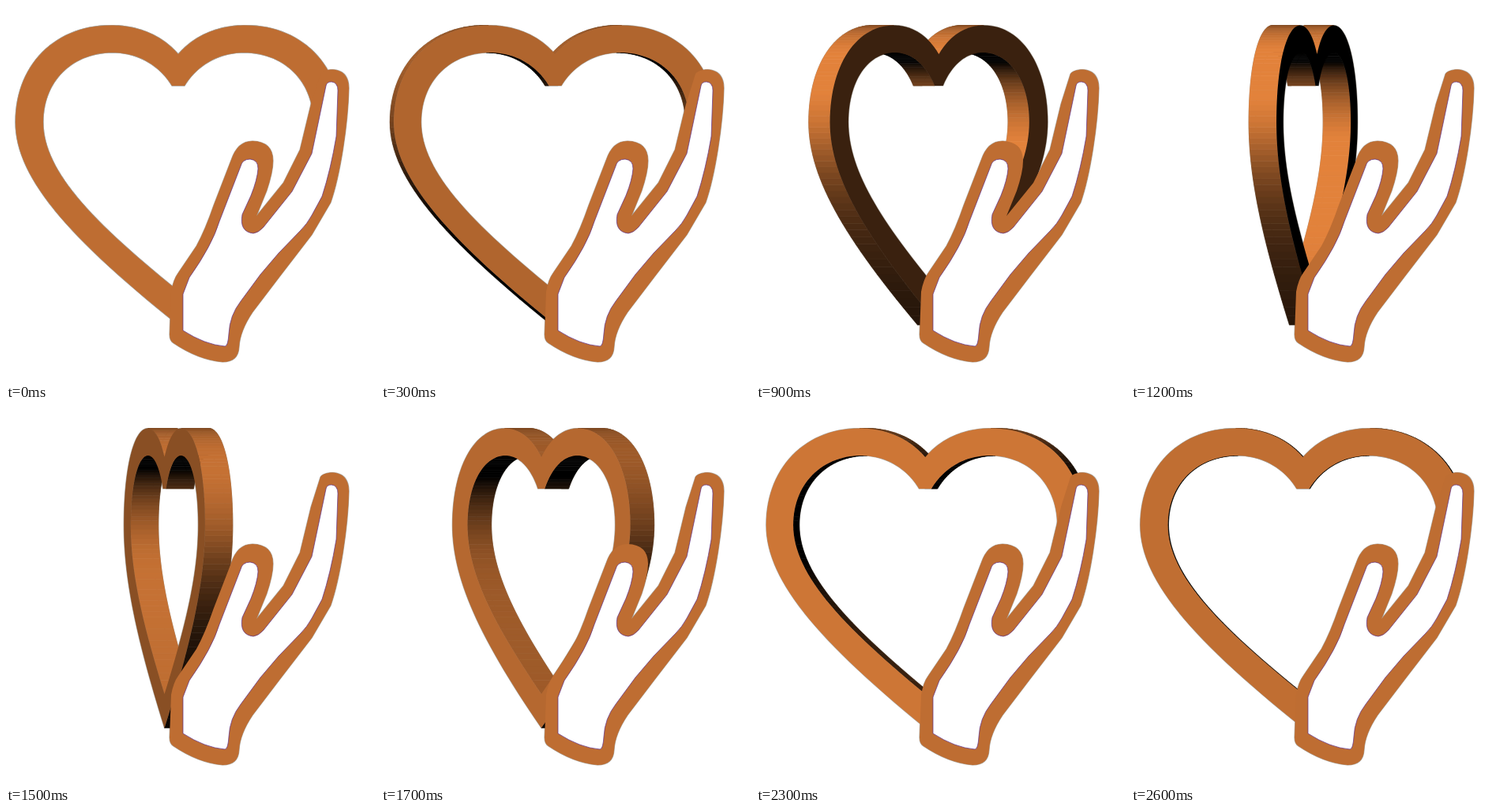
Write an HTML page with a canvas that moves like this. It is 467 by 475 pixels and loops after 2700 ms.

```html
<!DOCTYPE html>
<html lang="en">
<head>
<meta charset="utf-8">
<title>Turning heart in a hand</title>
<style>
html, body { margin: 0; width: 100%; height: 100%; overflow: hidden; background: #fff; }
canvas { display: block; }
</style>
</head>
<body>
<canvas id="stage" width="467" height="475"></canvas>
<script>
const ctx = document.getElementById('stage').getContext('2d');
const LOOP = 2700, STEP = 100, AXIS = 218, HALF_DEPTH = 18;
const LIGHT = { x: -92.5, up: 115, z: 189.6 };
const HALO = '#aaa69f';

// Left halves of the heart as joined cubic curves, from the notch to the tip
const OUTER = [[218, 61], [197, 37], [167, 24.5], [133, 24.5], [62, 24.5], [12, 75],
  [12, 147], [12, 215], [75, 290], [218, 404]];
const INNER = [[210, 101], [195, 76], [168, 59], [135, 59], [84, 59], [47, 95],
  [47, 147], [47, 207], [105, 270], [218, 361]];

const handEdge = new Path2D(`M398,86 C404,78 434,75 434,104 C433,150 423,215 411,249
  L387,290 L347,342 L312,388 Q296,412 295,432 Q294,451 274,451 Q243,448 212,427
  Q207,424 207,416 L209,362 Q212,346 218,338 L241,304 Q252,284 263,252 L285,195
  Q293,171 312,171 Q338,172 338,196 Q338,210 330,234 L317,266 L351,224 L372,182 L386,124 Z`);
const palm = new Path2D(`M405,101 Q406,96 412,96 Q420,97 420,107 L418,165 Q411,207 400,241
  L387,265 Q381,276 373,284 L345,313 L322,340 L297,374 Q283,392 282,415 Q281,431 277,431
  Q252,429 224,411 L224,365 L232,344 Q261,303 270,273 L297,203 Q299,194 309,194
  Q319,195 319,206 Q318,220 310,240 L299,264 Q295,286 313,288 Q320,287 326,280
  L362,235 L387,187 Z`);

function sampleCurves(points, parts = 30) {
  const out = [points[0]];
  for (let i = 0; i + 3 < points.length; i += 3) {
    const [a, b, c, d] = points.slice(i, i + 4);
    for (let k = 1; k <= parts; k++) {
      const u = k / parts, v = 1 - u;
      out.push([0, 1].map(j =>
        v * v * v * a[j] + 3 * v * v * u * b[j] + 3 * v * u * u * c[j] + u * u * u * d[j]));
    }
  }
  return out;
}

function wholeContour(half) {
  const left = sampleCurves(half).map(([x, y]) => [x - AXIS, y]);
  return [...left, ...left.map(([x, y]) => [-x, y]).reverse()];
}

const contours = [OUTER, INNER].map(wholeContour);

const walls = contours.flatMap((contour, inner) => contour.map((p, i) => {
  const q = contour[(i + 1) % contour.length];
  const dx = q[0] - p[0], dy = q[1] - p[1], len = Math.hypot(dx, dy);
  const sign = inner ? -1 : 1;
  return { p, q, len, nx: -sign * dy / len, ny: sign * dx / len, mid: (p[0] + q[0]) / 2 };
})).filter(wall => wall.len > 0);

function shade(light) {
  const v = Math.max(0, Math.min(226, light));
  return `rgb(${v}, ${v * 0.574}, ${v * 0.263})`;
}

function trace(path, points) {
  points.forEach(([x, y], i) => i ? path.lineTo(x, y) : path.moveTo(x, y));
  path.closePath();
  return path;
}

function outline(path, color, width) {
  ctx.strokeStyle = color;
  ctx.lineWidth = width;
  ctx.stroke(path);
}

// Half a turn, softly eased at both ends
function turnAt(time) {
  const u = time / LOOP;
  return Math.PI * (0.1 * u + 0.9 * u * u * (3 - 2 * u));
}

function drawHeart(turn) {
  const angle = turn > Math.PI / 2 ? turn - Math.PI : turn;
  const sin = Math.sin(angle), cos = Math.cos(angle);
  const project = ([x, y], z) => [AXIS + x * cos + z * sin, y];
  const face = z => contours.reduce(
    (path, contour) => trace(path, contour.map(p => project(p, z))), new Path2D());
  const front = face(HALF_DEPTH);

  outline(face(-HALF_DEPTH), HALO, 1.2);
  outline(front, HALO, 1.2);

  // Visible walls, farthest first
  walls.filter(wall => wall.nx * sin < 0)
    .sort((a, b) => (b.mid - a.mid) * sin)
    .forEach(({ p, q, nx, ny }) => {
      const quad = trace(new Path2D(), [project(p, HALF_DEPTH), project(q, HALF_DEPTH),
        project(q, -HALF_DEPTH), project(p, -HALF_DEPTH)]);
      ctx.fillStyle = shade(nx * (LIGHT.x * cos - LIGHT.z * sin) - ny * LIGHT.up);
      ctx.fill(quad);
      outline(quad, ctx.fillStyle, 0.7);
    });

  ctx.fillStyle = shade(LIGHT.x * sin + LIGHT.z * cos);
  ctx.fill(front, 'evenodd');
}

function drawHand() {
  ctx.fillStyle = '#be6d32';
  ctx.fill(handEdge);
  ctx.fillStyle = '#fff';
  ctx.fill(palm);
  outline(palm, '#5b2a86', 0.7);
}

function draw(now) {
  const time = Math.floor(now % LOOP / STEP) * STEP;
  ctx.fillStyle = '#fff';
  ctx.fillRect(0, 0, 467, 475);
  ctx.lineJoin = 'round';
  outline(handEdge, HALO, 1.2);
  drawHeart(turnAt(time));
  drawHand();
  requestAnimationFrame(draw);
}
draw(performance.now());
</script>
</body>
</html>
```
